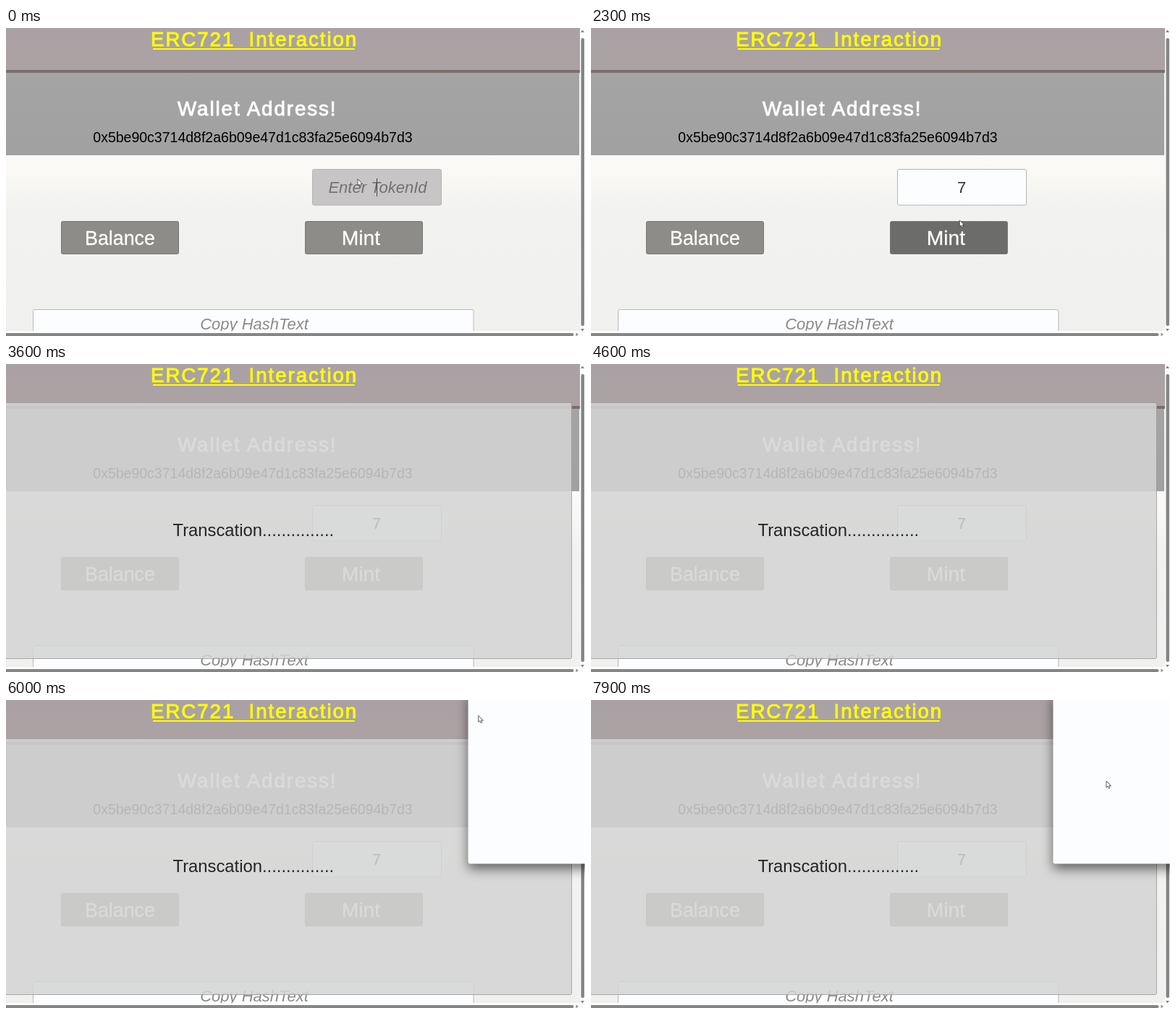
Recreate the animation shown at these times as an HTML page. Size 800 by 426 pixels, loop 8000 ms.

```html
<!DOCTYPE html>
<html lang="en">
<head>
<meta charset="utf-8">
<title>ERC721 Interaction</title>
<style>
  html, body { margin: 0; width: 100%; height: 100%; overflow: hidden; background: #f0f0ef; }
  svg { display: block; width: 100%; height: 100%; font-family: "Liberation Sans", Arial, sans-serif; }
  text { white-space: pre; }
  .mid { text-anchor: middle; }
  .head { font-size: 27.7px; letter-spacing: 1.94px; stroke-width: .9px; }
  .hint { font-size: 22px; font-style: italic; }
  .label { fill: #fff; stroke: #fff; stroke-width: .3px; }
  .button { fill: #8d8c88; stroke: #777673; }
  #popup { filter: drop-shadow(0 7px 8px rgba(0, 0, 0, .55)); }
</style>
</head>
<body>
<svg viewBox="0 0 800 426" preserveAspectRatio="none">
  <defs>
    <linearGradient id="sky" x2="0" y2="1">
      <stop offset="0" stop-color="#a9a1a5"/>
      <stop offset="1" stop-color="#aca2a3"/>
    </linearGradient>
    <linearGradient id="panel" x2="0" y2="1">
      <stop offset="0" stop-color="#a5a4a4"/>
      <stop offset="1" stop-color="#a2a1a1"/>
    </linearGradient>
    <linearGradient id="ground" x2="0" y2="1">
      <stop offset="0" stop-color="#fbfaf8"/>
      <stop offset=".12" stop-color="#f9f8f5"/>
      <stop offset=".3" stop-color="#f2f2f0"/>
      <stop offset="1" stop-color="#f0f0ef"/>
    </linearGradient>
  </defs>

  <rect width="793" height="58" fill="url(#sky)"/>
  <rect y="58" width="793" height="4" fill="#79706e"/>
  <rect y="62" width="792" height="114" fill="url(#panel)"/>
  <rect y="176" width="793" height="243" fill="url(#ground)"/>

  <text class="head" x="200" y="25" fill="#ff0" stroke="#ff0">ERC721  Interaction</text>
  <rect x="203" y="28" width="278.5" height="2" fill="#ff0"/>
  <text class="head" x="237" y="121" fill="#fff" stroke="#fff">Wallet Address!</text>
  <text x="120.3" y="158" font-size="19.5">0x5be90c3714d8f2a6b09e47d1c83fa25e6094b7d3</text>

  <rect id="field" x="423.5" y="195.5" width="178" height="49.5" rx="2" stroke="#b4b4b4"/>
  <text id="hint" class="hint mid" x="513.5" y="228" fill="#727071">Enter TokenId</text>
  <text id="token" class="mid" x="512" y="228" font-size="22" fill="#323232">7</text>
  <rect id="caret" y="208" width="1" height="25" fill="#444"/>

  <rect class="button" x="76.5" y="267.5" width="162" height="45" rx="2"/>
  <text class="label mid" x="157.5" y="299.5" font-size="26.8">Balance</text>
  <rect id="mint" class="button" x="413.5" y="267.5" width="162" height="45" rx="2"/>
  <text class="label mid" x="490.5" y="299.5" font-size="28.3">Mint</text>

  <rect x="37.5" y="389.5" width="608.5" height="40" rx="2" fill="#fcfdfe" stroke="#b8b8b8"/>
  <text class="hint mid" x="343" y="417" fill="#8a8a8b">Copy HashText</text>

  <g id="waiting">
    <rect x="-5" y="53.5" width="786.5" height="354" rx="2" fill="#d4d4d4" fill-opacity=".857" stroke="#999" stroke-opacity=".8"/>
    <text x="230.5" y="238" font-size="23.8" fill="#242424">Transcation...............</text>
  </g>

  <path d="M793 0H800V426H0V419H793Z" fill="#fcfcfc"/>
  <g fill="#858585">
    <rect x="794.5" y="14" width="4.5" height="398" rx="2"/>
    <rect x="-4" y="422" width="788.5" height="4" rx="2"/>
    <path d="M794 6L796.5 2.5L799 6ZM794 416H799L796.5 419.5ZM787.5 421.5L791 424L787.5 426Z"/>
  </g>

  <g id="popup">
    <rect x="638.5" y="-10" width="175" height="236.5" rx="3" fill="#fcfdfe"/>
  </g>
  <g id="loading">
    <circle cx="719" cy="66.5" r="37" fill="#e2571e"/>
    <path id="spinner" d="M723 115A5.5 5.5 0 1 0 723 123" fill="none" stroke="#f0862f" stroke-width="1.7"/>
  </g>

  <path id="cursor" d="M0 0V9L2 7.2L3.5 10.3L5.1 9.5L3.7 6.7H6.5Z" fill="#fff" stroke="#333" stroke-width=".8"/>
</svg>
<script>
const LOOP = 8000, STEP = 100;
const el = id => document.getElementById(id);
const show = (id, on) => el(id).style.display = on ? "" : "none";
const within = (t, from, to) => t >= from && t < to;

// Pointer stops: time, x, y
const path = [
  [0, 486, 209], [1300, 486, 209], [1800, 496, 283], [2000, 497.5, 288], [5900, 650, 0],
  [6300, 661, 86], [6700, 701, 102], [7300, 710, 110], [7900, 712, 112], [8000, 712, 112]
];

function pointer(t) {
  const i = path.findIndex(stop => stop[0] > t);
  const [t0, x0, y0] = path[i - 1], [t1, x1, y1] = path[i];
  const k = (t - t0) / (t1 - t0);
  return [x0 + (x1 - x0) * k, y0 + (y1 - y0) * k];
}

function draw(now) {
  const t = Math.floor(now % LOOP / STEP) * STEP;
  const typed = t >= 900, away = within(t, 3100, 5900);

  el("field").style.fill = t < 200 ? "#c7c5c6" : "#fcfdfe";
  show("hint", !typed);
  show("token", typed);
  show("caret", t < 2200 && t % 1200 < 600);
  el("caret").setAttribute("x", typed ? 518.5 : 512);
  el("mint").style.fill = within(t, 2200, 2400) ? "#6c6c6b" : "";

  show("waiting", t >= 2400);
  show("popup", t >= 4900);
  show("loading", within(t, 6500, 7700));
  el("spinner").setAttribute("transform", `rotate(${(t - 6700) * .36} 719 119)`);

  show("cursor", !away);
  const [x, y] = away ? [0, 0] : pointer(t);
  el("cursor").setAttribute("transform", `translate(${x} ${y})`);
  requestAnimationFrame(() => draw(performance.now() - start));
}

const start = performance.now();
draw(0);
</script>
</body>
</html>
```
